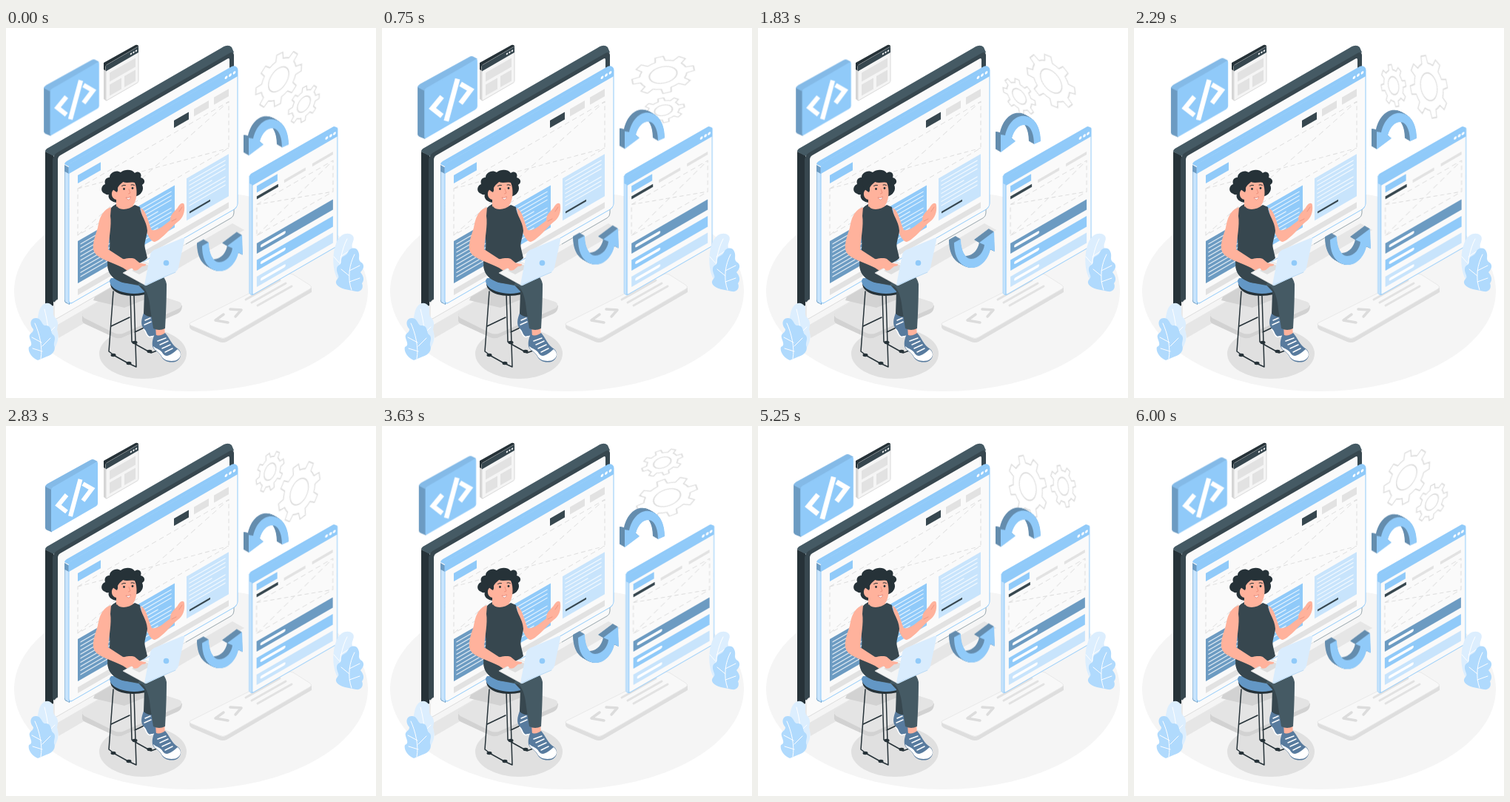
An HTML page that plays this animation: 500x500 px, repeating every 6040 ms.

```html
<!DOCTYPE html>
<html lang="en">
<head>
<meta charset="utf-8">
<title>Responsive web design</title>
<style>
html, body { margin: 0; width: 100%; height: 100%; overflow: hidden; background: #fff; }
svg { display: block; width: 100vw; height: 100vh; }
.spin, .beat, .float, .shake {
  animation: 1.5s linear calc(var(--t, 0) * -1ms) infinite paused;
}
.spin { animation-name: spin; animation-duration: 6s; transform-origin: 381.5px 80.3px; }
.beat { animation-name: beat; transform-origin: 88.5px 95px; }
.float { animation-name: float; }
.shake { animation-name: shake; animation-duration: 3s; }
@keyframes spin { to { transform: rotate(360deg); } }
@keyframes beat {
  0%, 30%, 40%, 60%, 100% { transform: scale(1); }
  10%, 50% { transform: scale(1.19); }
}
@keyframes float { 50% { transform: translateY(-10px); } }
@keyframes shake {
  10%, 90% { transform: translateX(-1px); }
  20%, 80% { transform: translateX(2px); }
  30%, 50%, 70% { transform: translateX(-4px); }
  40%, 60% { transform: translateX(4px); }
}
.blue { fill: #90caf9; }
.deep { fill: #6c9bc2; }
.side { fill: #658dae; }
.pale { fill: #c8e4fc; }
.face { fill: #fafafa; }
.grey { fill: #e2e2e2; }
.dark { fill: #37474f; }
.slate { fill: #455a64; }
.ink { fill: #263238; }
.white { fill: #fff; }
.skin { fill: #ffb29c; }
.shoe { fill: #587b9e; }
.line { fill: none; stroke-linecap: round; stroke-linejoin: round; }
.dash { fill: none; stroke: #dedede; stroke-dasharray: 6 4; }
.edge { stroke: #90caf9; }
</style>
</head>
<body>
<svg viewBox="0 0 500 500">
  <ellipse cx="250" cy="355.5" rx="239" ry="135.5" fill="#f5f5f5"/>

  <!-- floor shadows and monitor stand -->
  <path d="M68 402 306 264 322 273 71 419Z" fill="#e6e6e6"/>
  <ellipse cx="185" cy="440" rx="59" ry="34" fill="#e0e0e0"/>
  <path d="M103 386V395Q103 398 107 400L146 418Q153 421 160 417L232 386Q238 383 238 375Z" fill="#d2d2d2"/>
  <path d="M106 382 160 350Q166 347 172 350L234 370Q241 374 234 379L160 412Q153 415 146 412L106 392Q100 388 106 382Z" fill="#e4e4e4"/>
  <path d="M130 340 200 306V362L160 378 118 368Z" fill="#d2d2d2"/>

  <!-- monitor -->
  <path class="ink" d="M53 167 64 172V375L58 378Q53 376 53 372Z"/>
  <path class="slate" d="M53 167Q53 164 57 162L291 27Q300 21 305 26L308 33 64 173Z"/>
  <g transform="translate(63 172) skewY(-30)">
    <rect class="dark" width="245" height="201" rx="6"/>
    <rect class="face" x="2" y="199" width="243" height="25" rx="4" stroke="#dcdcdc"/>
    <rect class="face" x="7" y="6" width="232" height="203" rx="3"/>
    <path d="M180 224H241Q245 224 245 219V206" fill="none" stroke="#90a0a8" stroke-width=".7"/>
  </g>

  <!-- desktop window -->
  <path class="deep" d="M79 185 86 189V374L82 372Q79 371 79 368Z"/>
  <path class="pale" d="M79.5 194 85 197V373L82 371Q79.500 370 79.500 367Z"/>
  <path d="M79 184Q79 182 82 180L305 52Q309 50 312 53L313 55 85 187Z" class="blue"/>
  <g transform="translate(85 184) skewY(-30)">
    <rect class="face edge" width="228" height="190" rx="5"/>
    <path class="blue" d="M0 13V4Q0 0 4 0H224Q228 0 228 4V13Z"/>
    <g class="white"><circle cx="212.500" cy="5.500" r="1.900"/><circle cx="218" cy="5.500" r="1.900"/><circle cx="223.500" cy="5.500" r="1.900"/></g>
    <rect class="blue" x="12" y="22" width="31" height="11"/>
    <rect class="dark" x="142" y="23" width="20" height="10"/>
    <path class="grey" d="M169 23h20v10h-20zM196 23h20v10h-20zM12 176h204v8H12z"/>
    <path class="dash" d="M12 40H216V103H12ZL216 103M12 103 216 40"/>
    <rect class="deep" x="12" y="111" width="57" height="57"/>
    <rect class="blue" x="86" y="111" width="57" height="57"/>
    <rect class="pale" x="159" y="111" width="57" height="57"/>
    <g id="copy" class="line" stroke="#fff" stroke-opacity=".75"></g>
    <rect class="dark" x="163" y="158" width="28" height="2.500"/>
  </g>

  <!-- small browser card -->
  <path d="M132 48 135 50V98L132 96Z" fill="#d5d5d5"/>
  <path class="ink" d="M132 47 175 23Q177 22 179 24V28L135 53V58L132 56Z"/>
  <g transform="translate(135 50.500) skewY(-30)">
    <rect width="44" height="48" rx="1.500" fill="#f5f5f5" stroke="#d9d9d9"/>
    <rect class="dark" width="44" height="8"/>
    <g class="white"><circle cx="34" cy="4" r="1.200"/><circle cx="37.500" cy="4" r="1.200"/><circle cx="41" cy="4" r="1.200"/></g>
    <path class="grey" d="M5 13h35v12H5zM5 29h16v15H5zM25 29h15v15H25z"/>
  </g>

  <!-- code tile -->
  <g class="beat">
    <path class="deep" d="M53 81 62 84V143.500L55 140.500Q53 139.500 53 137.500Z"/>
    <path d="M53 82Q53 80 56 78L114 46Q117 44.500 119 45.500L124 48 61 86Z" fill="#84bae7"/>
    <rect class="blue" width="63" height="59.500" rx="2.500" transform="translate(61 84) skewY(-30)"/>
    <path d="M82 93 70.500 107 82 116M100.500 72 87 122M104 78 116 85 104 101" fill="none" stroke="#fff" stroke-width="6"/>
  </g>

  <g class="spin line" id="gears" stroke="#dedede" stroke-width="1.600"></g>

  <g class="float" id="arrows"></g>

  <!-- slab under the mobile window -->
  <path d="M248 399V404Q248 406 251 408L288 424Q293 426 298 424L413 357V351Z" fill="#dedede"/>
  <path d="M250 398 380 333Q384 331 388 333L410 347Q415 350 410 353L298 418Q293 421 288 418L250 402Q246 400 250 398Z" fill="#f8f8f8" stroke="#e8e8e8"/>
  <path class="line" d="M294 387 283 395 300 398M303 380 318 381 310 390" stroke="#dcdcdc" stroke-width="3.500"/>
  <path class="line" d="M324 367 370 341M332 371 378 345M340 375 386 349" stroke="#e2e2e2" stroke-width="3"/>

  <!-- mobile window -->
  <g class="shake">
    <path class="pale edge" stroke-width=".7" d="M329 200 333 202V361L330 359.500Q329 359 329 357Z"/>
    <path class="blue" d="M329 201Q329 199 331 197L443 133Q445 133 448 135V138L333 204V212L329 210Z"/>
    <g transform="translate(333 201) skewY(-30)">
      <rect class="face edge" width="115" height="160" rx="2"/>
      <rect class="blue" width="115" height="12"/>
      <g class="white"><circle cx="100.500" cy="5.700" r="1.900"/><circle cx="106" cy="5.700" r="1.900"/><circle cx="111" cy="5.700" r="1.900"/></g>
      <rect class="blue" x="6" y="16" width="28" height="9"/>
      <path class="grey" d="M43 29h29v4H43zM81 29h28v4H81z"/>
      <rect class="dark" x="6" y="30" width="29" height="4"/>
      <path class="dash" d="M6 41H109V83H6ZL109 83M6 83 109 41"/>
      <rect class="deep" x="6" y="93.500" width="103" height="14"/>
      <rect class="blue" x="6" y="116" width="103" height="14.500"/>
      <rect class="pale" x="6" y="138.500" width="103" height="14"/>
      <path class="line" d="M13 100.500H43M13 123H43M13 145.500H43" stroke="#fff" stroke-width="4"/>
    </g>
  </g>

  <!-- plants -->
  <path d="M58 436C44 428 39 405 44 386C46 374 54 369 60 373C67 377 62 384 65 390C72 396 70 402 69 408C73 418 69 432 60 438Z" fill="#dceefe"/>
  <path class="line" d="M59 436C59 415 56 395 52 380M58 412 66 404M57 408 46 398" stroke="#fff"/>
  <path d="M43 449C35 446 29 437 31 431C37 429 33 423 32 419C30 412 37 413 37 407C31 401 33 392 40 392C48 391 48 402 53 402C62 401 60 411 63 414C69 418 64 424 65 429C68 436 62 442 55 444Z" fill="#b0dafd"/>
  <path class="line" d="M47 447C50 432 45 412 39 399M49 430 60 419M48 425 35 418M49 437 36 433" stroke="#fff"/>
  <path d="M448 339C440 325 441 300 448 287C453 277 464 275 469 281C472 287 466 291 468 297C472 304 468 308 468 314C466 326 460 338 452 344Z" fill="#dceefe"/>
  <path class="line" d="M450 338C450 318 454 298 461 285M450 317 443 309M452 309 464 301" stroke="#fff"/>
  <path d="M458 353C447 350 443 344 448 339C452 336 446 331 447 325C448 319 454 321 453 314C453 307 460 309 462 303C465 296 474 296 476 302C479 308 475 312 479 316C486 320 483 326 479 330C483 335 485 340 481 345C484 352 479 357 473 356Z" fill="#b0dafd"/>
  <path class="line" d="M467 354C461 338 464 319 471 306M464 335 453 326M464 328 478 321M464 343 478 338" stroke="#fff"/>

  <!-- stool -->
  <path class="line" stroke="#263238" stroke-width="1.500" d="M145 356 139 437 147 443 165 453 176 458 173 362M168 358 170 424 178 429 196 439 204 436 194 358M142 403 167 391M174 411 199 399"/>
  <g class="ink"><ellipse cx="145" cy="442" rx="3.500" ry="2.200"/><ellipse cx="166" cy="453" rx="3.500" ry="2.200"/><ellipse cx="174" cy="425" rx="3.500" ry="2.200"/><ellipse cx="194" cy="437" rx="3.500" ry="2.200"/></g>
  <path class="ink" d="M141 345Q141 355 156 360C170 364 190 362 203 354V345Z"/>
  <path d="M140 341C140 350 150 356 163 358C180 361 198 356 204 348V338H142Z" fill="#6397c5"/>

  <!-- far leg -->
  <path class="shoe" d="M187 383C182 394 182 402 186 406C190 409 189 416 194 417L203 415V388Z"/>
  <path class="line" d="M186 407C190 410 189 416 194 417.500L202 416M188 395 195 392M187 401 196 397" stroke="#fff" stroke-width="1.500"/>
  <path class="dark" d="M172 340 204 350 198 390Q191 391 186 386L187 356Z"/>

  <!-- near leg -->
  <path class="skin" d="M202 402 214 402 215 416 203 418Z"/>
  <path class="shoe" d="M201 413C204 417 210 416 215 412C220 417 224 429 233 434C239 440 236 448 229 451C220 453 213 450 210 444C207 437 199 436 198 430C197 424 199 418 201 413Z"/>
  <path class="white" d="M199 430C203 434 209 434 212 440C217 447 225 440 232 434C239 440 236 447 229 449.500C220 451 213 449 210 443C207 437 199 435 199 430Z"/>
  <path class="line" d="M205 423 216 419M208 428 219 423M211 433 222 428M215 438 225 433" stroke="#fff" stroke-width="1.500"/>
  <path class="slate" d="M138 314C135 328 142 339 158 344L184 349C191 354 194 368 195 380L199 406Q207 410 215 406C216 390 217 366 217 346C215 335 206 328 190 320L150 314Z"/>
  <path class="dark" d="M138 314C135 328 142 339 158 344L178 347C185 340 190 334 196 332L190 320 150 314Z"/>

  <!-- upper body -->
  <path class="skin" d="M182 243C190 247 192 262 197 273C205 275 214 266 222 260C222 250 229 248 233 241C236 236 241 235 241 240C242 249 239 257 232 262C224 268 211 286 201 289C193 288 189 272 185 262Z"/>
  <path class="line" d="M224 261 230 258M234 248 238 242" stroke="#e88f7a" stroke-width=".8"/>
  <path class="skin" d="M148 224 149 240C144 246 146 252 158 255C170 256 176 246 178 242L166 237Z"/>
  <path class="dark" d="M140 247Q141 242 149 238C150 247 165 247 174 239L181 242C182 254 190 260 191 274C190 284 186 290 188 298L191 311C180 322 152 326 137 317C141 300 142 286 137 270Z"/>
  <path class="skin" d="M142 242C128 247 126 260 124 270C119 285 116 295 119 302C123 312 145 317 158 324L164 328C172 329 181 327 186 322L174 312C168 309 163 314 158 312L138 299C139 285 143 266 141 254Z"/>

  <!-- head -->
  <path class="ink" d="M134 224C127 222 128 213 134 211C132 204 137 202 140 202C140 195 149 191 155 195C161 190 171 191 174 196C180 192 184 197 182 202C189 204 188 210 184 212C187 218 183 225 177 227L150 236C142 235 137 230 139 225Q136 226 134 224Z"/>
  <path class="skin" d="M151 212C158 206 171 204 174 209C178 218 177 231 173 238C168 244 158 242 152 237L149 242V232C142 231 141 221 146 218C149 217 150 219 151 222Z"/>
  <path class="ink" d="M150 222C150 214 154 212 158 208C166 211 173 205 178 212C183 209 182 200 174 197C164 192 147 195 142 206C140 214 144 219 150 222Z"/>
  <g class="ink"><circle cx="159.500" cy="217.500" r="1.400"/><circle cx="171" cy="216.500" r="1.400"/></g>
  <path class="line" d="M156.500 213.500Q159 211.500 161.500 212.500M169 212Q171 211 173.500 212.500" stroke="#263238"/>
  <path class="line" d="M166 217.500 168 223 165.500 224" stroke="#ec8e79" stroke-width=".9"/>
  <path d="M162 229Q165.500 230.500 168.500 228Q168 232 165.500 232Q163.500 232 162 229Z" fill="#fff" stroke="#d96e62" stroke-width=".6"/>

  <!-- laptop -->
  <path d="M158 331 185 316 216 326 189 348Z" fill="#f5f5f5" stroke="#dedede" stroke-width=".8"/>
  <path d="M170 328 188 319 198 323 180 333Z" fill="#dedede"/>
  <path class="skin" d="M158 313C166 309 174 311 177 317L189 319Q190 322 184 322L178 327Q172 329 171 325L163 323Z"/>
  <path d="M187 347 195 306Q196 302 200 300L238 284Q242 283 241 287L233 324Q232 328 228 330L190 348Z" fill="#d9ecfd"/>
  <path class="line" d="M188 347.500 229 330" stroke="#b8d9f5"/>
  <circle class="blue" cx="216.500" cy="317.500" r="3.800"/>
</svg>
<script>
const $ = id => document.getElementById(id);

// Gear outline and hub, drawn flat and tilted onto the wall
function gear(x, y, r, hub, teeth) {
  const at = (a, k) => `${(r * k * Math.cos(a)).toFixed(2)} ${(r * k * Math.sin(a)).toFixed(2)}`;
  const step = 2 * Math.PI / teeth, dip = 0.76, root = r * dip;
  let d = "";
  for (let i = 0; i < teeth; i++) {
    const a = i * step;
    d += `${i ? `A${root} ${root} 0 0 1 ` : "M"}${at(a - step * .27, dip)}`
      + `L${at(a - step * .17, 1)}L${at(a + step * .17, 1)}L${at(a + step * .27, dip)}`;
  }
  d += `A${root} ${root} 0 0 1 ${at(-step * .27, dip)}Z`;
  return `<g transform="matrix(.866 -.5 0 1 ${x} ${y})"><path d="${d}"/><circle r="${hub}"/></g>`;
}
$("gears").innerHTML = gear(368, 70, 35, 15.5, 8) + gear(403.5, 102, 23.5, 10, 8);

// Arrow with its thickness stacked towards the upper left
function arrow(d) {
  let out = "";
  for (let i = 7; i > 0; i -= .5)
    out += `<path class="side" d="${d}" transform="translate(${-i} ${-i * .58})"/>`;
  return out + `<path class="blue" d="${d}"/>`;
}
$("arrows").innerHTML =
  arrow("M328 149 334 150C338 132 350 122 361 124C376 126 382 142 382 158L373 162C373 147 368 136 360 136C352 136 346 143 343 154L348 158 328 173Z") +
  arrow("M265 295 274 290C274 305 280 317 288 317C298 317 305 307 306 298L299 295 319 280 320 307 314 304C311 319 299 330 288 329C272 328 265 313 265 295Z");

// Text lines on the three cards
let lines = "";
for (const x of [16, 90, 163])
  for (let i = 0; i < 9; i++) {
    if (x > 100 && i > 6) break;
    lines += `M${x} ${117 + i * 5.5}h${i % 4 == 3 ? 30 : 48}`;
  }
$("copy").innerHTML = `<path d="${lines}" stroke-width="1.400"/>`;

// The loop cuts back slightly after a full turn, so its clock is scripted
const LOOP = 6040, LEAD = 40;
function tick() {
  const t = performance.now() % LOOP;
  document.documentElement.style.setProperty("--t", (LEAD + t).toFixed(2));
  requestAnimationFrame(tick);
}
tick();
</script>
</body>
</html>
```
